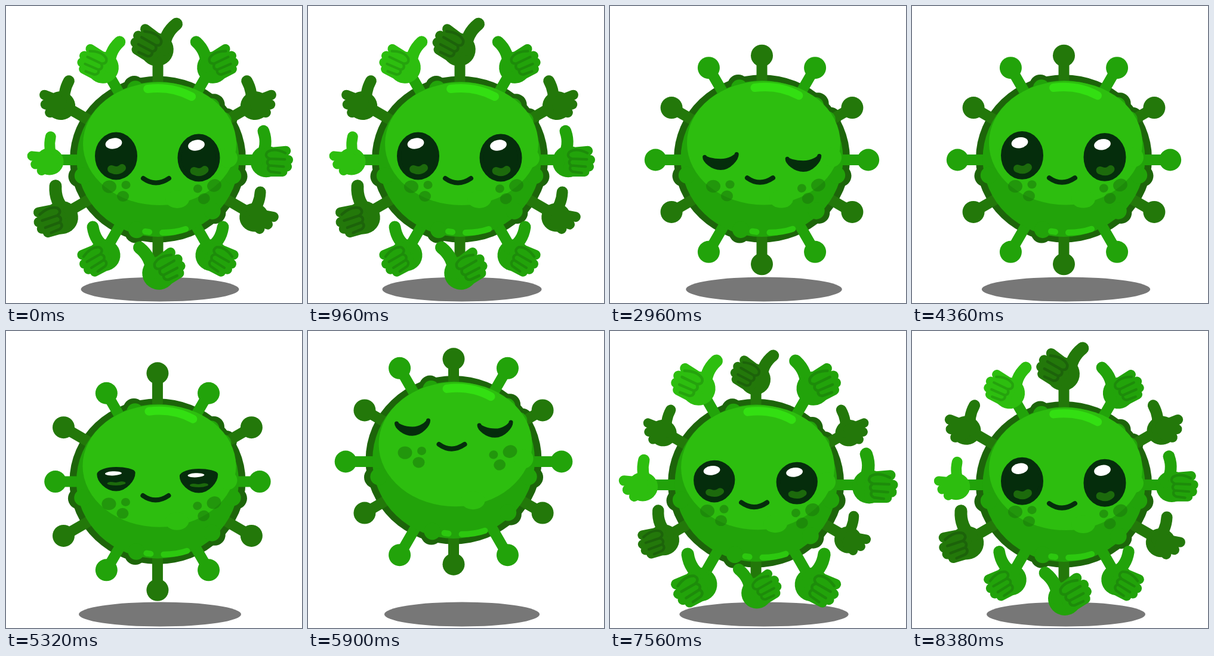
Write an HTML page that moves like this. It is 496 px wide and 498 px high and loops after 8480 ms.

```html
<!DOCTYPE html>
<html lang="en">
<head>
<meta charset="utf-8">
<title>Thumbs-up germ</title>
<style>
  html, body { margin: 0; width: 100%; height: 100%; overflow: hidden; background: #fff; }
  svg { display: block; width: 496px; height: 498px; }
</style>
</head>
<body>
<svg id="stage" viewBox="0 0 496 498" stroke-linecap="round" stroke-linejoin="round"></svg>
<script>
const LOOP = 8480, CX = 254.5, CY = 258, SPIKES = 12;
const INK = '#052d0c', OUTLINE = '#1d650a', SHINE = '#33df12';
const BRIGHT = { fill: '#2dbe0f', line: '#25a30d' };
const MID = { fill: '#22a30a', line: '#1d8c0a' };
const DARK = { fill: '#23780a', line: '#1c630a' };

const $ = id => document.getElementById(id);
const lerp = (a, b, u) => a + (b - a) * u;
const wave = (frame, period, peak) => Math.cos((frame - peak) / period * 2 * Math.PI);

const ellipse = (x, y, rx, ry, extra = '') => `<ellipse cx="${x}" cy="${y}" rx="${rx}" ry="${ry}" ${extra}/>`;
const stroke = (d, color, width) => `<path d="${d}" fill="none" stroke="${color}" stroke-width="${width}"/>`;

// An oval with bumps poking out of its rim
function bumpyOval(rx, ry, inset, r, color) {
  const bumps = [-107, -46, -32, 13, 45, 106, 167].map(degrees => {
    const a = degrees * Math.PI / 180;
    return ellipse(CX + (rx - inset) * Math.cos(a), 257 + (ry - inset) * Math.sin(a), r, r);
  });
  return `<g fill="${color}">${ellipse(CX, 257, rx, ry)}${bumps.join('')}</g>`;
}

// Upright thumb, fingers to the left; lined hands show curled fingers
function handArt(lined, { fill, line }) {
  if (!lined) {
    return ellipse(0, 3, 25, 24, `fill="${fill}"`)
      + stroke('M7 0Q-3 -20 2 -41', fill, 19)
      + stroke('M0 -4L-31 -7M0 4L-25 8M0 10L-14 19', fill, 17);
  }
  return ellipse(0, 3, 28, 28, `fill="${fill}"`)
    + stroke('M10 -4Q-4 -26 5 -51', fill, 21)
    + stroke('M0 -13L-35 -16M0 0H-39M0 12H-37M0 21H-29', fill, 17)
    + stroke('M-34 -12Q-14 -22 -2 -14Q4 -6 -6 -2L-33 -1M-6 -2Q2 4 -5 10L-31 12M-5 10Q0 17 -8 21L-24 23', line, 4.5);
}

function makeSpike(i) {
  const angle = i * 2 * Math.PI / SPIKES, even = i % 2 === 0;
  const dx = Math.sin(angle), dy = -Math.cos(angle);
  const flip = dx > 0 || i === 6 ? -1 : 1;
  const seenFromBack = [2, 4, 9, 10].includes(i);
  const tone = i === 9 || i === 11 ? BRIGHT : even && i !== 6 ? DARK : MID;
  const turn = -32 * dy * (i === 6 ? -1 : flip) * (i === 6 ? -1 : 1);
  return {
    dx, dy,
    side: even ? -1 : 1,
    color: even ? DARK.fill : MID.fill,
    hand: `<g id="hand${i}"><g transform="translate(${8 * dx} ${8 * dy}) scale(${flip * .97} .97) `
      + `rotate(${turn * flip})">${handArt(!seenFromBack, tone)}</g></g>`
  };
}
const spikes = Array.from({ length: SPIKES }, (_, i) => makeSpike(i));

const eye = (id, x, y) => `<g transform="translate(${x} ${y})">
  <path id="${id}" fill="${INK}" stroke="${INK}" stroke-width="7"/>
  <g id="${id}Glint">
    ${ellipse(-4, -21, 14, 9, 'fill="#fff" transform="rotate(-10 -4 -21)"')}
    ${stroke('M-8 22Q3 27 10 20', '#1c6a0c', 13)}
  </g></g>`;

const cheek = place => `<g fill="#1a780a" opacity=".55" transform="${place}">
  ${ellipse(0, 0, 12, 10.5)}${ellipse(28, -3, 7.5, 7)}${ellipse(23, 16, 10, 9)}</g>`;

$('stage').innerHTML = `
  <ellipse id="shadow" cx="258" cy="475" ry="20.5" fill="#777"/>
  <g id="germ">
    <g class="breath">${bumpyOval(147.5, 139.5, 12, 18, OUTLINE)}</g>
    ${spikes.map((s, i) => `<line id="stem${i}" stroke="${s.color}" stroke-width="18"/>`).join('')}
    <g class="breath">
      ${bumpyOval(136, 130, 7, 14, MID.fill)}
      <g fill="${BRIGHT.fill}">
        ${ellipse(257.5, 231, 128.5, 103)}
        ${ellipse(372, 255, 16, 16)}${ellipse(287, 324, 20, 15)}
      </g>
      <g id="shine">
        ${stroke('M237 139Q278 134 311 152', SHINE, 14)}
        ${stroke('M233 378L240 379M262 380Q284 380 301 374', '#2cc80f', 10)}
      </g>
      <g id="face">
        ${cheek('translate(173 303)')}${cheek('translate(349 301) scale(-1 1) rotate(17)')}
        ${eye('eyeL', 184.5, 251.5)}${eye('eyeR', 323, 254.5)}
        ${stroke('M230 289Q251 304 273 289', INK, 8)}
      </g>
    </g>
    ${spikes.map((s, i) => `<circle id="ball${i}" fill="${s.color}"/>`).join('')}
    ${spikes.map(s => s.hand).join('')}
  </g>`;

// A round eye that flattens into a smiling crescent
function eyePath(open) {
  const bend = lerp(.3, .552, open), k = .552;
  const left = [lerp(-25.5, -32, open), lerp(3, 0, open)];
  const right = [lerp(27.5, 32, open), lerp(-2, 0, open)];
  const top = [1 - open, lerp(12, -36.5, open)];
  const bottom = [1 - open, lerp(20, 36.5, open)];
  const sideCtrl = (s, m) => `${s[0]} ${s[1] + bend * (m[1] - s[1])}`;
  const midCtrl = (s, m) => `${m[0] + k * (s[0] - m[0])} ${m[1]}`;
  const rise = (s, m) => `C${sideCtrl(s, m)} ${midCtrl(s, m)} ${m[0]} ${m[1]}`;
  const fall = (m, s) => `C${midCtrl(s, m)} ${sideCtrl(s, m)} ${s[0]} ${s[1]}`;
  return `M${left[0]} ${left[1]}` + rise(left, top) + fall(top, right) + rise(right, bottom) + fall(bottom, left) + 'Z';
}

function set(id, attrs) {
  const node = $(id);
  for (const name in attrs) node.setAttribute(name, attrs[name]);
}

function draw(frame) {
  // Smooth step from 0 to 1 between two frames
  const ramp = (from, to) => {
    const u = Math.min(1, Math.max(0, (frame - from) / (to - from)));
    return u * u * (3 - 2 * u);
  };
  const pulse = wave(frame, 30, 10);
  const leap = ramp(110, 127) - ramp(133, 146);
  const land = ramp(135, 148) - ramp(148, 162);
  const drift = ramp(112, 126) - ramp(160, 174);
  const grow = 1 - ramp(42, 55) + ramp(137, 147) + .2 * Math.sin(Math.PI * ramp(137, 160));
  const open = 1 - ramp(58, 63) + ramp(63, 70) - ramp(110, 117) + ramp(156, 164);

  set('shadow', { rx: 136 + 6 * wave(frame, 60, 39) });
  set('germ', { transform: `translate(${-10.5 * drift} ${19 * land - 39 * leap})` });
  set('shine', { transform: `translate(${3.6 * (1 - wave(frame, 90, 4))} 0)` });
  set('face', { transform: `translate(0 ${12 * land - 58 * leap})` });

  const stretch = 1 + .0095 * (pulse + .5);
  for (const layer of document.querySelectorAll('.breath'))
    layer.setAttribute('transform', `translate(0 ${10 * land + 397 * (1 - stretch)}) scale(1 ${stretch})`);

  for (const id of ['eyeL', 'eyeR']) {
    set(id, { d: eyePath(open) });
    set(id + 'Glint', {
      transform: `translate(0 ${14 * (1 - open)}) scale(1 ${open})`,
      visibility: open > .15 ? 'visible' : 'hidden'
    });
  }

  spikes.forEach(({ dx, dy, side }, i) => {
    const beat = side * pulse, reach = 176.5 + 5.4 * beat;
    const x = CX + dx * reach, y = CY + dy * reach;
    set('stem' + i, { x1: CX + dx * 115, y1: CY + dy * 115, x2: x, y2: y });
    set('ball' + i, { cx: x, cy: y, r: 18.5 - 6 * Math.min(grow, 1) });
    set('hand' + i, {
      transform: `translate(${x} ${y}) scale(${grow * (1 + .05 * beat)})`,
      visibility: grow > .01 ? 'visible' : 'hidden'
    });
  });
}

// Three poses per 140 ms, held for 20, 100 and 20 ms
function frameAt(ms) {
  const rest = ms % 140;
  return Math.floor(ms / 140) * 3 + (rest < 20 ? 0 : rest < 120 ? 1 : 2);
}

const start = performance.now();
function tick() {
  draw(Math.min(179, frameAt((performance.now() - start) % LOOP)));
  requestAnimationFrame(tick);
}
tick();
</script>
</body>
</html>
```
